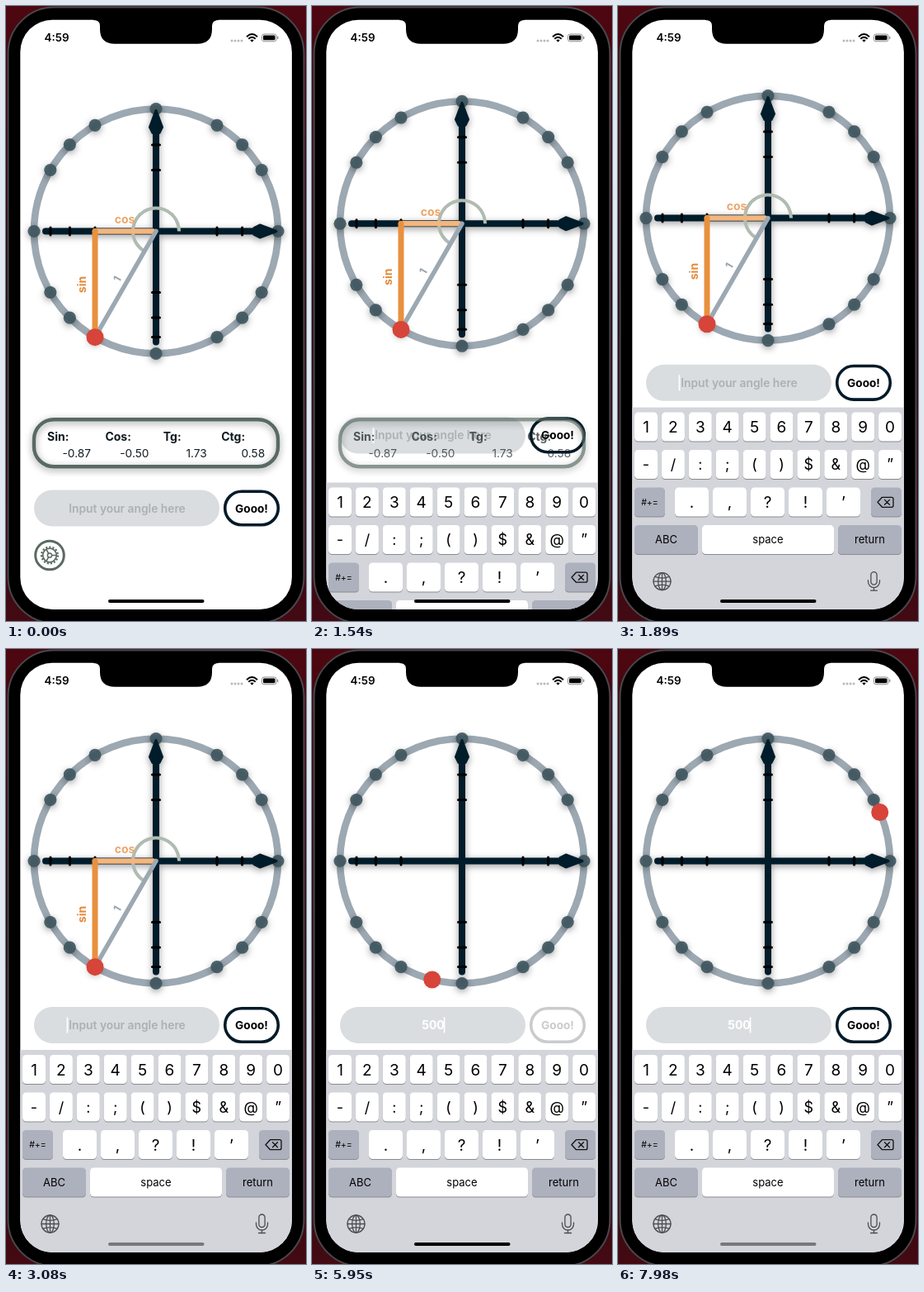
Animation, 364 px wide and 744 px high, one loop 8000 ms. Source, as an HTML page:

```html
<!DOCTYPE html>
<html lang="en">
<head>
<meta charset="utf-8">
<title>Unit circle</title>
<style>
  html, body { margin: 0; width: 100%; height: 100%; overflow: hidden; background: #000; }
  svg { display: block; width: 364px; height: 744px; font-family: Inter, sans-serif; }
  .bold { font-weight: 700; }
  .semi { font-weight: 600; }
  .mid { text-anchor: middle; }
  .end { text-anchor: end; }
  .round { stroke-linecap: round; stroke-linejoin: round; }
</style>
</head>
<body>
<svg viewBox="0 0 364 744">
  <defs>
    <linearGradient id="backdrop" x2="0" y2="1">
      <stop offset="0" stop-color="#4e0711"/>
      <stop offset=".5" stop-color="#22060b"/>
      <stop offset="1" stop-color="#430a13"/>
    </linearGradient>
    <filter id="shadow" x="-20%" y="-20%" width="140%" height="140%">
      <feDropShadow dx="0" dy="2.500" stdDeviation="4" flood-opacity=".4"/>
    </filter>
    <clipPath id="screen"><rect x="17.300" y="16.700" width="329.600" height="713.300" rx="39"/></clipPath>
  </defs>

  <rect width="364" height="744" fill="url(#backdrop)"/>
  <rect x="2.500" y="1.500" width="359" height="745" rx="56" fill="#000" stroke="#48484c" stroke-width="2"/>

  <g clip-path="url(#screen)">
    <rect width="364" height="744" fill="#fff"/>

    <g id="world">
      <circle r="148" fill="none" stroke="#9ca8b2" stroke-width="8.600"/>
      <g id="dots" fill="#3f575f" fill-opacity=".92" filter="url(#shadow)"></g>
      <g filter="url(#shadow)" fill="#021c2b" stroke="#021c2b" class="round">
        <path d="M-134 0H125M0 134V-125" stroke-width="8"/>
        <path id="arrow" d="M146 0L126 7.500L119 4V-4L126 -7.500Z" stroke-width="3"/>
        <use href="#arrow" transform="rotate(-90)"/>
      </g>
      <g id="ticks" stroke="#000" stroke-width="3" class="round"></g>
      <g id="triangle">
        <path d="M28 0A28 28 0 1 0 -14 24.250" fill="none" stroke="#b0bbb1" stroke-width="4"/>
        <path d="M-74 0H-4" stroke="#f3b67e" stroke-width="6.500" class="round"/>
        <path d="M0 0L-74 128.200" stroke="#9ca8b2" stroke-width="5.500" class="round"/>
        <path d="M-74 0V128" stroke="#e8913f" stroke-width="7" class="round"/>
        <g class="bold mid" font-size="14">
          <text x="-38" y="-9.500" fill="#eda669">cos</text>
          <text transform="translate(-85 64.500) rotate(-90)" fill="#e48b3d">sin</text>
          <text transform="translate(-43 60) rotate(-60)" fill="#98a3ac" font-size="13">1</text>
        </g>
      </g>
      <circle id="point" r="10.500" fill="#d7443a"/>
    </g>

    <g id="entry">
      <rect x="34" y="-22" width="225" height="44" rx="22" fill="#d9dddf"/>
      <text id="hint" class="semi mid" x="147" y="5" font-size="13.800" fill="#abb0b3">Input your angle here</text>
      <text id="typed" class="bold mid" x="147" y="5" font-size="14" fill="#fff"></text>
      <rect id="caret" y="-9.500" width="1.700" height="19" fill="#fff"/>
      <g id="button">
        <rect x="265.700" y="-20.300" width="64.600" height="40.600" rx="20.300" fill="none" stroke-width="3.600"/>
        <text class="bold mid" x="298" y="5" font-size="13.600" stroke="none">Gooo!</text>
      </g>
    </g>

    <g id="panel">
      <rect x="34" y="500.200" width="296" height="57" rx="24" fill="none" stroke="#596a62" stroke-width="4.400" filter="url(#shadow)"/>
    </g>

    <g transform="translate(53 664.500)" fill="none" stroke="#596a62">
      <circle r="17.300" stroke-width="3"/>
      <circle r="8.300" stroke-width="1.700"/>
      <circle r="10" stroke-width="2.200" stroke-dasharray="2.100 2.089"/>
      <circle r="2.600" stroke-width="1.500"/>
      <path d="M2.600 0H8M-1.300 2.250L-4 6.900M-1.300 -2.250L-4 -6.900" stroke-width="1.600"/>
    </g>

    <g id="keyboard">
      <rect x="17" y="485" width="331" height="262" fill="#d3d5db"/>
      <g id="keys" class="mid"></g>
      <g fill="none" stroke="#4b4d51" stroke-width="1.300" class="round">
        <path d="M320.500 593.700H332Q334 593.700 334 595.700V603.700Q334 605.700 332 605.700H320.500L315 599.700ZM323.500 596.800L329.500 602.700M329.500 596.800L323.500 602.700" stroke="#111"/>
        <g transform="translate(53.500 695.500)">
          <circle r="10.500"/>
          <ellipse rx="4.800" ry="10.500"/>
          <path d="M-10.500 0H10.500M0 -10.500V10.500M-8.500 -5.800Q0 -2.300 8.500 -5.800M-8.500 5.800Q0 2.300 8.500 5.800"/>
        </g>
        <g transform="translate(310.500 695)">
          <rect x="-3.600" y="-11" width="7.200" height="15.500" rx="3.600"/>
          <path d="M-7 -1V1A7 7 0 0 0 7 1V-1M0 8V11.500M-4 11.500H4"/>
        </g>
      </g>
    </g>

    <rect id="home" x="124" y="718" width="116.500" height="4" rx="2"/>
  </g>

  <path d="M106 15H258V17Q250 17 250 24V28Q250 45.700 232 45.700H132Q114 45.700 114 28V24Q114 17 106 17Z"/>
  <text class="semi mid" x="61.500" y="43.300" font-size="13.400">4:59</text>
  <g fill="#b9b9bb">
    <circle cx="274" cy="42" r="1.500"/><circle cx="278" cy="42" r="1.500"/>
    <circle cx="282" cy="42" r="1.500"/><circle cx="286" cy="42" r="1.500"/>
  </g>
  <g fill="none" stroke="#000" stroke-width="1.900">
    <path d="M292 37.200Q298.500 31 305 37.200M294.300 39.700Q298.500 35.800 302.700 39.700"/>
    <path d="M296.300 41.300L298.500 43.700L300.700 41.300Q298.500 39.600 296.300 41.300Z" fill="#000" stroke="none"/>
    <rect x="310.500" y="34" width="17.500" height="8.800" rx="2.600" stroke="#8d8d8f" stroke-width="1"/>
    <rect x="312" y="35.500" width="14.500" height="5.800" rx="1.300" fill="#000" stroke="none"/>
    <path d="M329.700 36.800V40" stroke="#8d8d8f" stroke-width="1.300"/>
  </g>
</svg>

<script>
const $ = id => document.getElementById(id);
const add = (parent, tag, attrs, text = '') => {
  const node = document.createElementNS('http://www.w3.org/2000/svg', tag);
  for (const name in attrs) node.setAttribute(name, attrs[name]);
  node.textContent = text;
  $(parent).append(node);
};
const RADIUS = 148;
const onCircle = degrees => {
  const a = degrees * Math.PI / 180;
  return { cx: RADIUS * Math.cos(a), cy: -RADIUS * Math.sin(a) };
};

for (let quarter = 0; quarter < 360; quarter += 90)
  for (const step of [0, 30, 45, 60])
    add('dots', 'circle', { ...onCircle(quarter + step), r: 7.6 });

for (const d of [-128, -104.6, -74, 74, 104.6]) {
  add('ticks', 'path', { d: `M${d} -4.500V4.500` });
  add('ticks', 'path', { d: `M-4.500 ${-d}H4.500` });
}

[['Sin:', '-0.87'], ['Cos:', '-0.50'], ['Tg:', '1.73'], ['Ctg:', '0.58']].forEach(([label, value], i) => {
  const x = 50 + i * 70.4;
  add('panel', 'text', { x, y: 526, class: 'bold', 'font-size': 14, fill: '#111b20' }, label);
  add('panel', 'text', { x: x + 53, y: 546, class: 'end', 'font-size': 13.7, fill: '#111b20' }, value);
});

function key(x, y, width, label, size = 19, dark = false) {
  const box = { x, width, height: 35, rx: 4.5 };
  add('keys', 'rect', { ...box, y: y + 1, fill: '#898b90' });
  add('keys', 'rect', { ...box, y, fill: dark ? '#adb1bd' : '#fff' });
  add('keys', 'text', { x: x + width / 2, y: y + 17.7 + size * .36, 'font-size': size }, label);
}
[...'1234567890'].forEach((c, i) => key(20 + i * 32.9, 491, 28, c));
[...'-/:;()$&@”'].forEach((c, i) => key(20 + i * 32.9, 536.5, 28, c, 18));
[...'.,?!’'].forEach((c, i) => key(69 + i * 46, 582, 41, c));
key(20, 582, 37, '#+=', 10.5, true);
key(307, 582, 37, '', 10, true);
key(20, 627.5, 77, 'ABC', 13, true);
key(102, 627.5, 160, 'space', 13);
key(267, 627.5, 77, 'return', 13, true);

const clamp = v => Math.min(1, Math.max(0, v));
const ramp = (t, from, to) => clamp((t - from) / (to - from));
// Remaining distance of a critically damped spring.
const springLeft = (t, start, rate) => {
  const x = Math.max(0, t - start) / 1000 * rate;
  return (1 + x) * Math.exp(-x);
};
// Progress along cubic-bezier(.42, 0, .58, 1).
function easeInOut(x) {
  let low = 0, high = 1;
  for (let i = 0; i < 20; i++) {
    const s = (low + high) / 2, r = 1 - s;
    if (1.26 * r * r * s + 1.74 * r * s * s + s ** 3 < x) low = s; else high = s;
  }
  return low * low * (3 - 2 * low);
}

const within = (t, spans) => spans.some(([from, to]) => t >= from && t < to);
const caretOn = [[1400, 2520], [3080, 4060], [4550, 5390], [5530, 6040], [6620, 7180], [7700, 8000]];
const homeDim = [[1960, 3430], [6020, 8000]];

function angleAt(t) {
  if (t < 7071) return 240 + 120 * easeInOut(ramp(t, 5571, 7071));
  return 360 + 23.5 * ((t - 7071) / 909) ** 2;
}

function draw(t) {
  const left = springLeft(t, 1414, 15.4);
  $('world').setAttribute('transform', `translate(182 ${256.5 + 16 * left})`);
  $('entry').setAttribute('transform', `translate(0 ${455 + 152.5 * left})`);
  $('keyboard').setAttribute('transform', `translate(0 ${259 * springLeft(t, 1414, 17.5)})`);
  $('panel').setAttribute('opacity', 1 - ramp(t, 1450, 1750));
  $('triangle').setAttribute('opacity', 1 - ramp(t, 5500, 5780));

  const { cx, cy } = onCircle(angleAt(t));
  $('point').setAttribute('cx', cx);
  $('point').setAttribute('cy', cy);

  const count = [3430, 4550, 4830].filter(time => t >= time).length;
  $('typed').textContent = '500'.slice(0, count);
  $('hint').setAttribute('opacity', count ? 0 : 1);
  $('caret').setAttribute('x', count ? 146.5 + count * 4.4 : 73.6);
  $('caret').setAttribute('opacity', within(t, caretOn) ? 1 : 0);

  const off = ramp(t, 5500, 5640) - ramp(t, 7200, 7340);
  const mix = (a, b) => Math.round(a + (b - a) * off);
  const ink = `rgb(${mix(2, 202)},${mix(26, 203)},${mix(40, 205)})`;
  $('button').setAttribute('stroke', ink);
  $('button').setAttribute('fill', off ? ink : '#000');
  $('home').setAttribute('fill', within(t, homeDim) ? '#77787b' : '#000');
}

const FRAME = 70;
function tick() {
  const t = performance.now() % 8000;
  draw(Math.floor(t / FRAME) * FRAME);
  requestAnimationFrame(tick);
}
tick();
</script>
</body>
</html>
```
